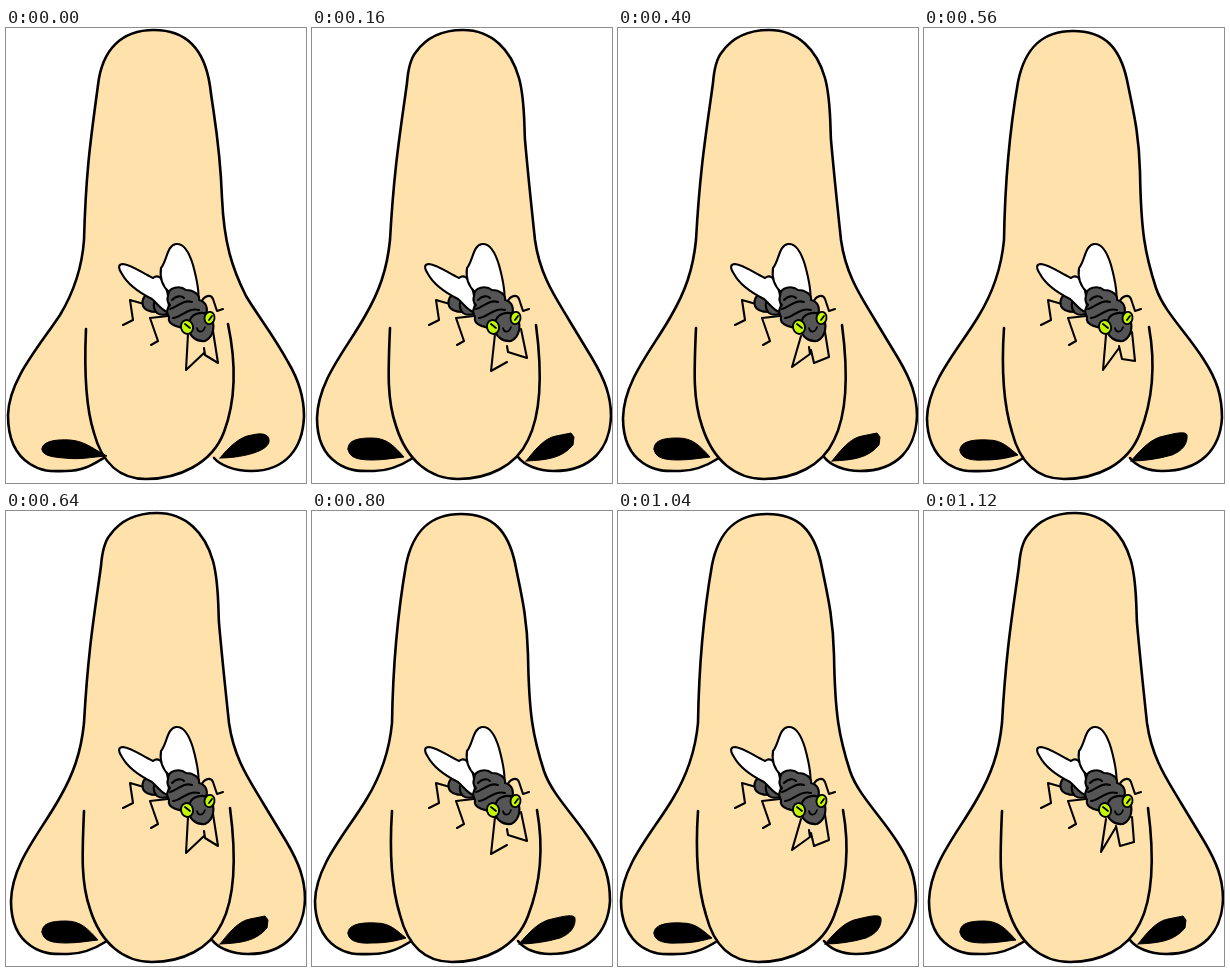
Recreate the animation shown at these times as an HTML page with a canvas. Size 300x455 px, loop 1.2 s.

```html
<!DOCTYPE html>
<html lang="en">
<head>
<meta charset="utf-8">
<title>Fly on a nose</title>
<style>
html, body { margin: 0; width: 100%; height: 100%; overflow: hidden; background: #fff; }
canvas { display: block; }
</style>
</head>
<body>
<canvas id="stage" width="300" height="455"></canvas>
<script>
const ctx = document.getElementById('stage').getContext('2d');
const STEP = 80, STEPS = 15;
const SKIN = '#ffe1ab', GREY = '#555', GREEN = '#c3f800';

// Three wobbling drawings of the nose
const noses = [
  {
    outline: 'M100 429C92 432 82 443 60 443C48 443 38 445 24 436C8 426 2 408 2 387C3 352 32 320 54 287C66 267 76 240 78 212C80 140 85 110 92 57C96 22 115 2 148 2C183 2 199 24 204 58C208 90 214 115 216 170C218 215 226 240 240 268C252 288 268 308 282 334C294 354 298 370 298 388C297 420 280 443 245 443C228 443 214 437 208 430',
    bulb: 'M80 301C78 345 80 380 88 405C96 435 114 451 140 451C172 451 206 436 218 404C230 372 230 334 222 296',
    nostrils: 'M36 421C36 414 48 411 64 412C80 413 90 423 101 428C84 429 76 432 58 430C44 429 36 427 36 421ZM214 430C222 420 234 408 246 407C258 404 264 407 263 414C261 424 234 430 214 430Z'
  },
  {
    outline: 'M101 430C90 437 78 443 62 443C50 443 38 444 25 435C10 425 5 409 5 390C6 352 34 322 53 288C67 264 75 242 78 212C82 140 88 106 95 55C96 42 99 30 104 24C114 10 130 2 151 2C180 2 199 22 207 50C213 72 212 96 213 112C216 146 220 184 223 212C228 248 244 270 257 292L280 330C293 352 299 368 299 388C298 420 280 443 242 443C226 443 212 437 206 429',
    bulb: 'M78 300C76 345 75 372 84 398C95 433 118 451 146 451C176 451 204 438 216 412C228 388 231 350 224 297',
    nostrils: 'M36 421C36 412 46 410 60 410C75 410 82 418 92 429C82 430 72 432 60 432C44 432 37 429 36 421ZM214 433C222 423 232 410 244 408L259 405L262 409L261 417C250 430 236 432 214 433Z'
  },
  {
    outline: 'M101 429C90 436 78 443 60 443C48 443 38 445 24 436C9 426 3 408 3 390C4 354 34 322 54 289C67 268 77 244 80 212C81 150 86 100 94 54C101 19 119 3 149 3C181 3 196 20 203 52C209 82 215 104 216 144C217 204 221 226 232 260C240 284 264 306 280 332C293 352 298 368 298 390C296 422 276 443 238 443C224 443 212 438 206 430',
    bulb: 'M80 300C77 345 80 378 88 404C96 435 114 451 140 451C172 451 204 437 216 405C228 374 232 338 225 299',
    nostrils: 'M36 422C36 414 48 411 64 412C78 412 84 419 94 427C84 430 74 432 60 432C44 433 36 429 36 422ZM207 433C218 420 228 410 240 408C252 405 262 403 263 407C264 416 258 423 248 427C234 431 220 433 207 433Z'
  }
].map(nose => ({
  outline: new Path2D(nose.outline),
  bulb: new Path2D(nose.bulb),
  nostrils: new Path2D(nose.nostrils)
}));

// Eight poses of the rubbing front legs: left leg, then right leg
const rubs = [
  'M182 306L180 342L198 325M207 303L212 335L199 327L198 320',
  'M182 306L180 342L197 329M208 303L214 332L198 326L197 319',
  'M183 306L179 343L195 334M209 301L215 330L196 324L195 318',
  'M181 306L178 338L194 334L194 319M208 304L213 328L195 327',
  'M182 306L176 335L194 332L194 320M208 304L212 331L196 331L196 321',
  'M183 308L174 339L192 326L191 319M207 304L211 329L196 335L193 322',
  'M182 308L177 341L192 316M208 306L210 331L196 335L192 315',
  'M182 307L179 342L195 320M208 304L211 333L198 331L195 318'
].map(d => new Path2D(d));

const legs = new Path2D('M138 276L124 272L127 292L117 297M162 288L144 290L152 313L145 317M195 275C198 267 205 266 207 271L211 283L217 281');

const body = [
  ['M148 264C139 265 135 271 137 278C139 283 145 284 151 284L158 272Z', GREY],
  ['M152 268C146 274 147 281 151 285C155 288 160 287 166 285L170 268Z', GREY],
  ['M162 284C156 283 152 276 146 271C134 265 122 257 116 246C112 240 112 236 117 236C126 237 136 245 147 250C152 246 156 250 158 256C162 262 164 276 162 284Z', '#fff'],
  ['M163 264C154 256 154 247 155 240C161 233 161 217 170 216C179 215 184 227 187 237C190 248 194 264 192 274L176 274Z', '#fff'],
  ['M162 268C162 259 174 257 180 262C188 262 194 267 193 272C201 274 202 281 200 287L184 299C174 301 161 297 163 289C160 284 161 280 164 277C161 274 161 271 162 268Z', GREY],
  ['M166 272C170 268 175 267 178 270M164 281C172 279 177 271 186 274M167 290C174 290 182 279 193 282', null],
  ['M184 292C187 284 199 283 204 288C210 296 208 309 199 313C190 314 184 308 183 302Z', GREY]
].map(([d, fill]) => [new Path2D(d), fill]);

const smile = new Path2D('M191 300C192 305 197 305 199 299');
const pupils = new Path2D('M179 296L184 300M203 292L206 288');

function draw(path, fill, width = 2.1) {
  if (fill) {
    ctx.fillStyle = fill;
    ctx.fill(path);
  }
  ctx.lineWidth = width;
  ctx.stroke(path);
}

function drawEye(x, y, rx, ry, tilt) {
  const eye = new Path2D();
  eye.ellipse(x, y, rx, ry, tilt, 0, Math.PI * 2);
  draw(eye, GREEN, 1.9);
}

function drawNose({ outline, bulb, nostrils }) {
  draw(outline, SKIN, 2.6);
  draw(bulb, SKIN, 2.6);
  draw(nostrils, '#000', 1);
}

function drawFly(rub) {
  draw(legs);
  draw(rub);
  for (const [path, fill] of body) draw(path, fill);
  drawEye(181, 299, 6, 7, -0.3);
  drawEye(203.5, 290, 5, 6.2, 0.2);
  draw(pupils, null, 1.8);
  draw(smile, null, 1.7);
}

function render(now) {
  const step = Math.floor(now / STEP) % STEPS;
  ctx.fillStyle = '#fff';
  ctx.fillRect(0, 0, 300, 455);
  ctx.strokeStyle = '#000';
  ctx.lineCap = ctx.lineJoin = 'round';
  drawNose(noses[[0, 2, 1][step % 3]]);
  drawFly(rubs[step % 8]);
}

const start = performance.now();
function tick() {
  render(performance.now() - start);
  requestAnimationFrame(tick);
}
tick();
</script>
</body>
</html>
```
